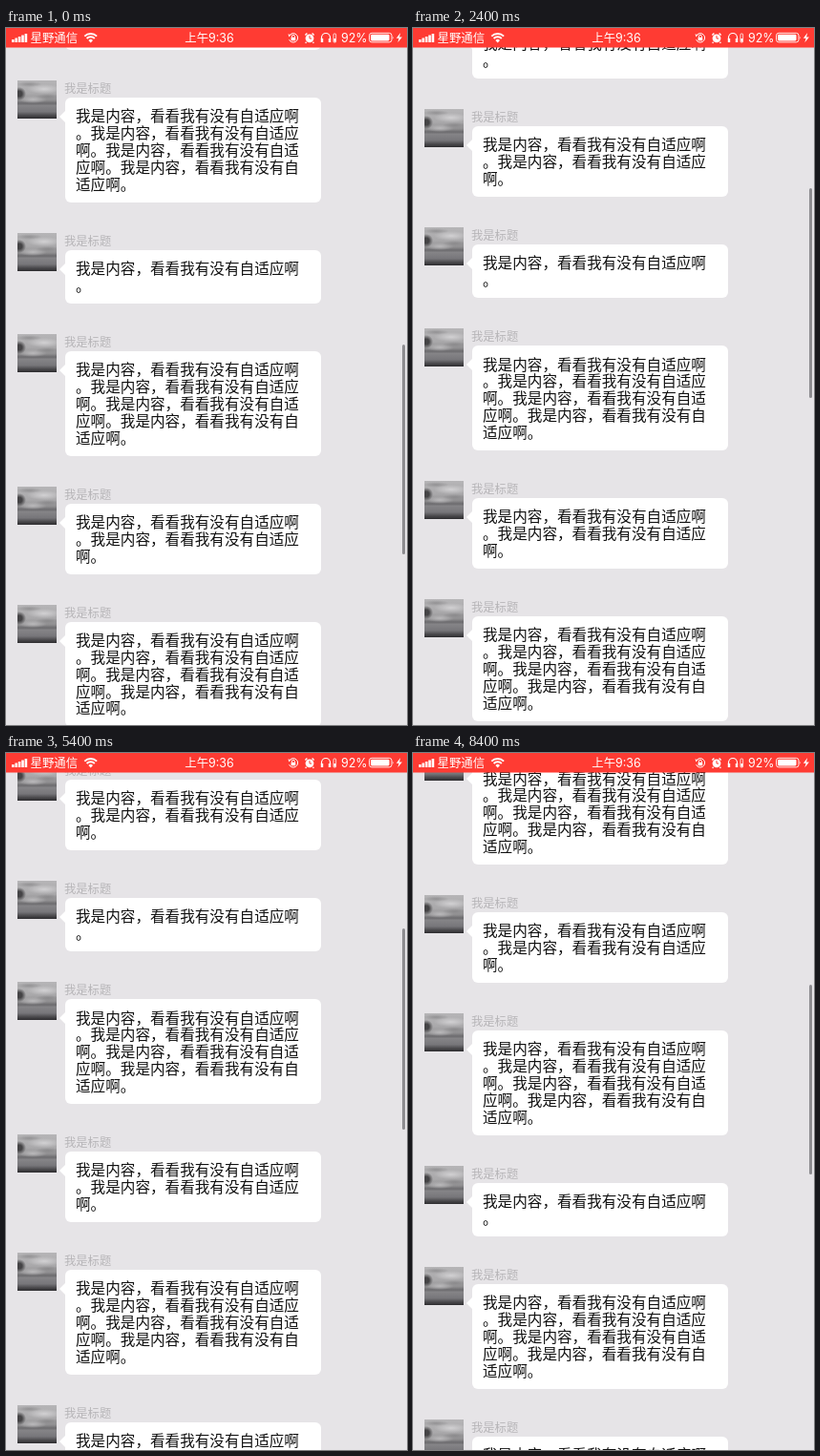
Write an HTML page that moves like this. It is 420 by 731 pixels and loops after 9.2 s.

```html
<!DOCTYPE html>
<html lang="zh-CN">
<head>
<meta charset="utf-8">
<title>自适应列表</title>
<style>
html, body { margin: 0; width: 100%; height: 100%; overflow: hidden; background: #fff; }
body { position: relative; font-family: "Noto Sans CJK SC", "Noto Sans CJK", sans-serif; }
#list { position: absolute; top: 20px; left: 0; width: 420px; background: #e6e4e7; }
.cell { position: relative; }
.cell > * { position: absolute; }
.avatar {
  left: 12px; top: 15px; width: 41px; height: 40px;
  background:
    radial-gradient(ellipse 7px 7px at 2px 14px, #454446 40%, transparent),
    radial-gradient(ellipse 18px 5px at 28px 9px, #d2d1d3, transparent),
    radial-gradient(ellipse 14px 3px at 12px 4px, #929193, transparent),
    radial-gradient(ellipse 13px 3px at 32px 17px, #8a898b, transparent),
    radial-gradient(ellipse 15px 4px at 16px 20px, #bbbabc, transparent),
    linear-gradient(#b6b5b7, #a9a8aa 35%, #8f8e90 52%, #6c6b6e 60%, #858487 66%, #77767a 82%, #4a494c 92%, #2d2c2f);
}
.title { left: 61px; top: 14px; font-size: 12.3px; line-height: 18px; color: #b7b5b8; white-space: pre; }
.bubble {
  left: 61.5px; top: 32.8px; width: 268.5px; box-sizing: border-box;
  padding: 10.5px 0 0 11.5px; border-radius: 6px; background: #fff;
  color: #111; font-size: 15.6px; line-height: 17.8px; white-space: pre;
}
.bubble::before {
  content: ""; position: absolute; left: -5.5px; top: 14px;
  border: solid transparent; border-width: 6px 6px 6px 0; border-right-color: #fff;
}
#bar { position: absolute; left: 414.8px; width: 2.8px; border-radius: 2px; background: #8d8c90; }
#status { position: absolute; left: 0; top: 0; }
</style>
</head>
<body>
<div id="list"></div>
<div id="bar"></div>
<svg id="status" width="420" height="20.5" fill="#fff" font-family="Inter, 'Noto Sans CJK SC', sans-serif" font-size="12.4">
  <rect width="420" height="20.5" fill="#ff3b33"/>
  <path d="M6 12h2.6v3H6zM9.4 10.5H12V15H9.4zM12.8 9h2.6v6h-2.6zM16.2 7.5h2.6V15h-2.6zM19.6 6h2.6v9h-2.6z"/>
  <text x="25.5" y="15">星野通信</text>
  <path d="M82.3 8.6a9 9 0 0 1 12.8 0M84.6 11a5.8 5.8 0 0 1 8.2 0" fill="none" stroke="#fff" stroke-width="1.9"/>
  <path d="M88.7 15.4l-2.3-2.4a3.2 3.2 0 0 1 4.6 0z"/>
  <text x="213" y="15" text-anchor="middle">上午9:36</text>
  <g fill="none" stroke="#fff">
    <path d="M297.4 7.2a4.7 4.7 0 1 1-.8 5"/>
    <path d="M299.4 9.8V8.8a1.5 1.5 0 0 1 3 0v1"/>
    <path d="M313.4 7.4l2-2M322.6 7.4l-2-2M314.6 14.8l-1 1M321.4 14.8l1 1" stroke-width="1.4"/>
    <path d="M330.5 12v-2a4.5 4.5 0 0 1 9 0v2" stroke-width="1.2"/>
    <rect x="343" y="6" width="2.6" height="9" rx=".8" stroke-width=".8"/>
  </g>
  <path d="M295.6 6.2l.6 3 2.5-1.6zM298.6 9.8h4.6v3.4h-4.6z"/>
  <circle cx="318" cy="10.8" r="4.4"/>
  <path d="M318 8v3h2.2" fill="none" stroke="#ff3b33"/>
  <path d="M329.8 11h2.4v4h-2.4zM337.8 11h2.4v4h-2.4zM343.4 11h1.8v3.6h-1.8z"/>
  <text x="351" y="15">92%</text>
  <rect x="380.5" y="5.3" width="23.5" height="9.6" rx="2.6" fill="none" stroke="#fff" stroke-width=".9"/>
  <rect x="382" y="6.8" width="19.5" height="6.6" rx="1.3"/>
  <path d="M404.9 8.4q1.5 1.7 0 3.4zM413.2 5l-4.4 5.7h2.8l-1.3 4.6 4.6-5.9H412z"/>
</svg>
<script>
const SENTENCE = '我是内容，看看我有没有自适应啊。';
const PER_LINE = 15, LINE = 17.8, STEP = 200, LOOP = 9200;
const VIEW = 711, BAR_TOP = 22, BAR_END = 728;

// Sentences in each message
const repeats = [...'44112142414241122122'].map(Number);

// Time, scroll offset, scrollbar length
const keys = [
  [0, 1026, 220], [1400, 25.5, 220], [2400, 482, 220], [3800, 1378.7, 215],
  [4200, 1450, 211], [5400, 557, 211], [7200, 1877.4, 199], [8400, 808, 199]
];

const list = document.getElementById('list');
const bar = document.getElementById('bar');
let total = 0;

function add(parent, name, text = '') {
  const el = document.createElement('div');
  el.className = name;
  el.textContent = text;
  parent.append(el);
  return el;
}

for (const count of repeats) {
  const text = SENTENCE.repeat(count);
  const lines = text.match(new RegExp(`.{1,${PER_LINE}}`, 'g'));
  const height = lines.length * LINE + 21;
  const cell = add(list, 'cell');
  cell.style.height = height + 49.7 + 'px';
  total += height + 49.7;
  add(cell, 'avatar');
  add(cell, 'title', '我是标题');
  add(cell, 'bubble', lines.join('\n')).style.height = height + 'px';
}

const secant = i => (keys[i + 1][1] - keys[i][1]) / (keys[i + 1][0] - keys[i][0]);

// Zero at turning points, so the scroll never overshoots
function slope(i) {
  if (i === 0) return secant(0) / 2;
  if (i === keys.length - 1) return 0;
  const a = secant(i - 1), b = secant(i);
  return a * b <= 0 ? 0 : 2 * a * b / (a + b);
}

function pose(t) {
  let i = 0;
  while (i < keys.length - 2 && t >= keys[i + 1][0]) i++;
  const [t0, s0, l0] = keys[i], [t1, s1, l1] = keys[i + 1];
  const d = t1 - t0, u = Math.min(1, (t - t0) / d), v = 1 - u;
  const scroll = v * v * (1 + 2 * u) * s0 + u * u * (1 + 2 * v) * s1
    + d * u * v * (v * slope(i) - u * slope(i + 1));
  return { scroll, length: l0 + (l1 - l0) * u };
}

function draw(now) {
  const { scroll, length } = pose(Math.floor(now % LOOP / STEP) * STEP);
  const over = Math.max(0, scroll - (total - VIEW));
  const top = Math.min(BAR_TOP + scroll * length / 727, BAR_END - length) + over;
  list.style.transform = `translateY(${-scroll}px)`;
  bar.style.top = top + 'px';
  bar.style.height = length - over + 'px';
  requestAnimationFrame(draw);
}

requestAnimationFrame(draw);
</script>
</body>
</html>
```
